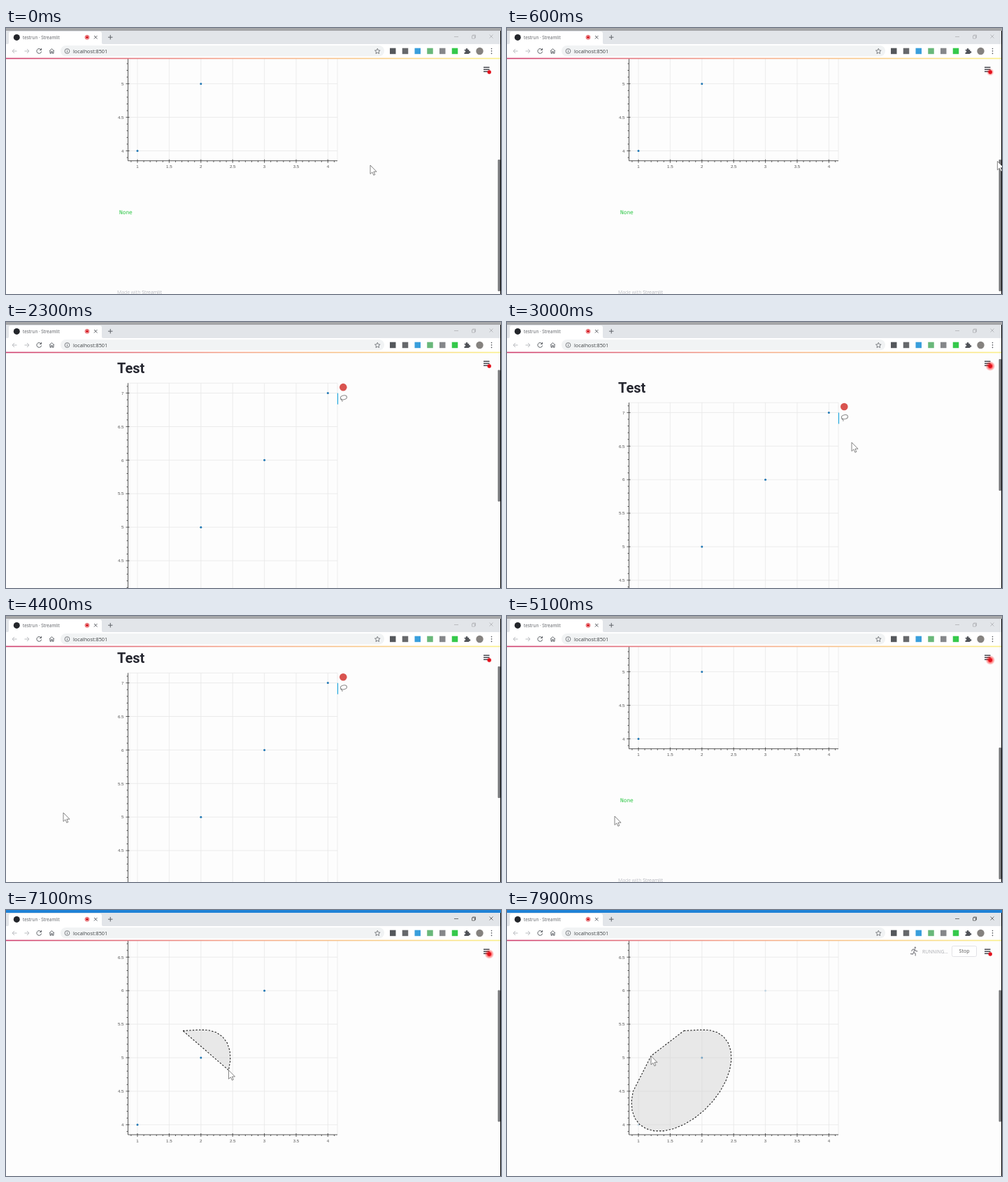
An HTML page for the animation above (8 s loop, 708 px wide and 380 px high).

```html
<!DOCTYPE html>
<html lang="en">
<head>
<meta charset="utf-8">
<title>testrun · Streamlit</title>
<style>
  html, body { margin: 0; width: 100%; height: 100%; overflow: hidden; background: #fdfdfd; }
  svg { display: block; width: 708px; height: 380px; }
  text { font-family: "Open Sans", "Noto Sans", sans-serif; }
  .tick text { font: 6.2px "Liberation Sans", Arial, sans-serif; fill: #555; }
  .line { fill: none; stroke: #5f6368; }
</style>
</head>
<body>
<svg viewBox="0 0 708 380">
  <defs>
    <linearGradient id="rainbow">
      <stop offset="0" stop-color="#cf3f70"/>
      <stop offset=".45" stop-color="#f5a58c"/>
      <stop offset="1" stop-color="#fbf08a"/>
    </linearGradient>
    <radialGradient id="halo">
      <stop offset=".3" stop-color="#f00" stop-opacity=".75"/>
      <stop offset="1" stop-color="#f00" stop-opacity="0"/>
    </radialGradient>
  </defs>
  <rect width="708" height="380" fill="#fdfdfd"/>

  <!-- Scrolling page; y = 0 is the plot value 5 -->
  <g id="page">
    <text x="159" y="-220" style="font:700 20px Roboto,sans-serif" fill="#262730">Test</text>
    <g id="plot"></g>
    <circle cx="482.3" cy="-200" r="5.3" fill="#d9534f"/>
    <path d="M474.5-191.5v16" stroke="#26aae1" stroke-width="1.2"/>
    <g class="line" style="stroke:#8a8a8a">
      <ellipse cx="483" cy="-185.3" rx="4.6" ry="3" transform="rotate(-12 483 -185.3)"/>
      <path d="M479.5-183.5q-1.5 1.5.5 2t.8 2.3"/>
    </g>
    <text x="162" y="186.3" style="font:7.8px 'DejaVu Sans Mono',monospace" fill="#2cc745">None</text>
    <text x="159" y="300" font-size="6.85" fill="#c3c4ca">Made with <tspan fill="#b3b4bb">Streamlit</tspan></text>
  </g>
  <path id="lasso" fill="#d3d3d3" fill-opacity=".5" stroke="#222" stroke-width="1.1" stroke-dasharray="2.4 2.2"/>

  <g id="running">
    <g class="line" stroke-width="1.3" style="stroke:#8d8d92" stroke-linecap="round" stroke-linejoin="round">
      <circle cx="583.8" cy="53.8" r=".7"/>
      <path d="M578.8 58.5l1.2-2 3-.4 1.8 2.4 2 .4M583 56.5l-1.2 4 2.4 1.8v2.7M581.6 60.5l-1.2 2.5-3-.5"/>
    </g>
    <text x="594" y="61.8" font-size="6.8" fill="#aaabb0">RUNNING...</text>
    <rect x="636.5" y="51.5" width="35" height="15" rx="2" fill="#fff" stroke="#e2e2e6"/>
    <text x="654" y="61.4" font-size="7.1" text-anchor="middle" fill="#555">Stop</text>
  </g>
  <path d="M683 56.2h8.5m-8.5 3h8.5m-8.5 3h8.5" stroke="#4a4b52" stroke-width="1.4"/>
  <circle id="glow" cx="691.2" cy="63" fill="url(#halo)"/>
  <circle cx="691.2" cy="63" r="2.7" fill="#e3101c"/>

  <!-- Browser window -->
  <rect width="708" height="24" fill="#e2e5e9"/>
  <rect id="edge" width="708" height="4"/>
  <path d="M1 23.5q3 0 3-3V8q0-3 3-3H134q3 0 3 3v12.5q0 3 3 3z" fill="#fff"/>
  <rect y="23" width="708" height="20" fill="#fff"/>
  <rect x="78" y="25" width="463" height="15.5" rx="7.7" fill="#f1f3f4"/>
  <rect y="42.7" width="708" height="1.6" fill="url(#rainbow)"/>
  <circle cx="15.3" cy="13.4" r="4.5" fill="#24262b"/>
  <text x="24" y="15.7" font-size="6.3" fill="#5b5e63">testrun · Streamlit</text>
  <text x="96" y="35.7" font-size="7.3" fill="#3c4043">localhost:8501</text>
  <circle cx="116" cy="13.3" r="2" fill="#d81e26"/>
  <circle cx="116" cy="13.3" r="3" fill="none" stroke="#d81e26" stroke-width=".7"/>
  <g class="line">
    <path d="M126 11l4.5 4.500m0-4.500l-4.500 4.500M146 13.200h6.500m-3.250-3.250v6.500"/>
    <path d="M15.500 33H9m3-3l-3 3 3 3M26.500 33H33m-3-3l3 3-3 3" stroke="#b9bbbf"/>
    <path d="M50 30.800a3.400 3.400 0 1 0 .7 2.700M50.600 29v2.500h-2.500"/>
    <path d="M62 33l3.500-3.300L69 33M63 32.500v3.700h1.700v-2.500h1.600v2.500H68v-3.700"/>
    <circle cx="87.500" cy="33" r="3.400" stroke-width=".8"/>
    <path d="M87.500 32.500v2.300m0-4v.8" stroke-width=".9"/>
    <path d="M531.300 29.300l1.100 2.500 2.700.3-2 1.800.5 2.700-2.300-1.400-2.300 1.400.5-2.700-2-1.800 2.700-.3z" stroke-width=".8"/>
  </g>
  <g id="extensions"></g>
  <path d="M655.500 31h2.200a1.400 1.400 0 1 1 2.600 0h2v2.200a1.400 1.400 0 1 1 0 2.500v1.300h-6.800v-2.200a1.300 1.300 0 1 0 0-2.500z" fill="#505358"/>
  <circle cx="677.5" cy="33" r="5.2" fill="#85827f"/>
  <path d="M694.5 29.5v.1m0 3.300v.1m0 3.300v.1" stroke="#505358" stroke-width="1.6" stroke-linecap="round"/>
  <path id="controls" fill="none" stroke-width=".8" d="M641 12.500h6M666.500 11h4v4h-4zM667.500 11v-1h4v4h-1M691.500 9.500l5 5m0-5l-5 5"/>

  <rect id="thumb" x="703.5" width="3.5" height="188" rx="1" fill="#77787b"/>
  <path d="M707.5 4v376" stroke="#000"/>
  <path id="cursor" d="M0 0V12.500L2.900 9.900 4.900 14.300 6.800 13.400 4.900 9.200H9z" fill="#fff" stroke="#666" stroke-width=".8"/>
</svg>
<script>
const $ = id => document.getElementById(id);
const UNIT_X = 90.8, UNIT_Y = 95.8, LEFT = 174.5, RIGHT = 474;
const px = v => 188 + (v - 1) * UNIT_X;
const py = v => (5 - v) * UNIT_Y;
const TOP = py(7) - 14.2, BOTTOM = py(4) + 14.2;

function buildPlot() {
  let grid = `M${LEFT} ${TOP}H${RIGHT}V${BOTTOM}`;
  let axes = `M${LEFT} ${TOP}V${BOTTOM}H${RIGHT}`;
  let labels = '', dots = '';
  for (let i = 9; i <= 41; i++) {
    const x = px(i / 10), y = py(i / 10 + 3), major = i % 5 === 0;
    axes += `M${x} ${BOTTOM - (major ? 2 : 0)}v${major ? 5 : 2}`;
    axes += `M${LEFT - (major ? 3 : 2)} ${y}h${major ? 5 : 2}`;
    if (!major) continue;
    grid += `M${x} ${TOP}V${BOTTOM}M${LEFT} ${y}H${RIGHT}`;
    labels += `<text x="${x}" y="${BOTTOM + 10.5}" text-anchor="middle">${i / 10}</text>
      <text x="168.5" y="${y + 2.2}" text-anchor="end">${i / 10 + 3}</text>`;
    if (i % 10 === 0) dots += `<circle class="dot" cx="${x}" cy="${y}" r="1.5" fill="#1f77b4"/>`;
  }
  $('plot').innerHTML = `<path d="${grid}" fill="none" stroke="#e8e8e8" stroke-width=".8"/>
    <path d="${axes}" fill="none" stroke="#444" stroke-width=".9"/><g class="tick">${labels}</g>${dots}`;
}

function buildExtensions() {
  const colors = ['#55585c', '#67696c', '#3a9fdc', '#69b87a', '#85878a', '#35c94b'];
  $('extensions').innerHTML = colors.map((c, i) =>
    `<rect x="${549 + 17.75 * i}" y="28.7" width="8.5" height="8.5" fill="${c}"/>`).join('');
}

// Keys are [time, ...values], eased from each to the next.
function at(keys, t) {
  const next = keys.findIndex(k => k[0] > t);
  if (next < 1) return keys.at(next).slice(1);
  const a = keys[next - 1], b = keys[next];
  const f = (t - a[0]) / (b[0] - a[0]), ease = f * f * (3 - 2 * f);
  return a.slice(1).map((v, n) => v + (b[n + 1] - v) * ease);
}

const scroll = [[600, 257.3], [1300, 91.5], [3000, 16], [3400, 0], [4245, 0], [4795, 257.3],
  [5500, 257.3], [6000, 126]];
const pointer = [[0, 521, 196], [700, 712, 190], [2300, 712, 130], [3000, 493, 172],
  [4400, 82, 281], [5100, 154, 286], [6500, 270, 173.5], [6700, 253, 172.5]];
const START = 6700, END = 7900;

// The lasso starts at a corner, rounds a tilted ellipse and leaves it in a straight line.
function lassoPoint(f) {
  if (f === 0) return [253, 172.5];
  if (f === 1) return [206, 208.5];
  const a = -1.4 + 5 * f;
  return [249.5 + 71.5 * Math.cos(a), 243.5 + 72.5 * Math.sin(a - 0.47)];
}

function lassoPath(f) {
  const path = [];
  for (let i = 0; i <= f * 24; i++) path.push(lassoPoint(i / 24));
  return [...path, lassoPoint(f)];
}

function draw(t) {
  const [offset] = at(scroll, t);
  const drag = t >= START;
  const path = drag ? lassoPath(Math.min(1, (t - START) / (END - START))) : [];
  const tip = drag ? path.at(-1) : at(pointer, t);
  $('page').setAttribute('transform', `translate(0 ${337 - offset})`);
  $('thumb').setAttribute('y', 44 + 0.56 * offset);
  $('cursor').setAttribute('transform', `translate(${tip})`);
  $('lasso').setAttribute('d', drag ? `M${path.join('L')}Z` : '');
  document.querySelectorAll('.dot').forEach((dot, i) =>
    dot.setAttribute('opacity', t >= 7600 && i !== 1 ? 0.2 : 1));

  $('running').style.display = t >= 7700 ? '' : 'none';
  $('edge').setAttribute('fill', drag ? '#1f82d6' : '#a5a6a8');
  $('controls').setAttribute('stroke', drag ? '#555' : '#b0b2b5');
  const pulse = (1 - Math.cos(t / 1000 * Math.PI)) / 2;
  $('glow').setAttribute('r', 2.7 + 4.3 * pulse);
  $('glow').setAttribute('opacity', pulse);
}

buildPlot();
buildExtensions();
const begin = performance.now();
function tick() {
  const t = (performance.now() - begin) % 8000;
  draw(Math.floor(t / 100) * 100);
  requestAnimationFrame(tick);
}
tick();
</script>
</body>
</html>
```
